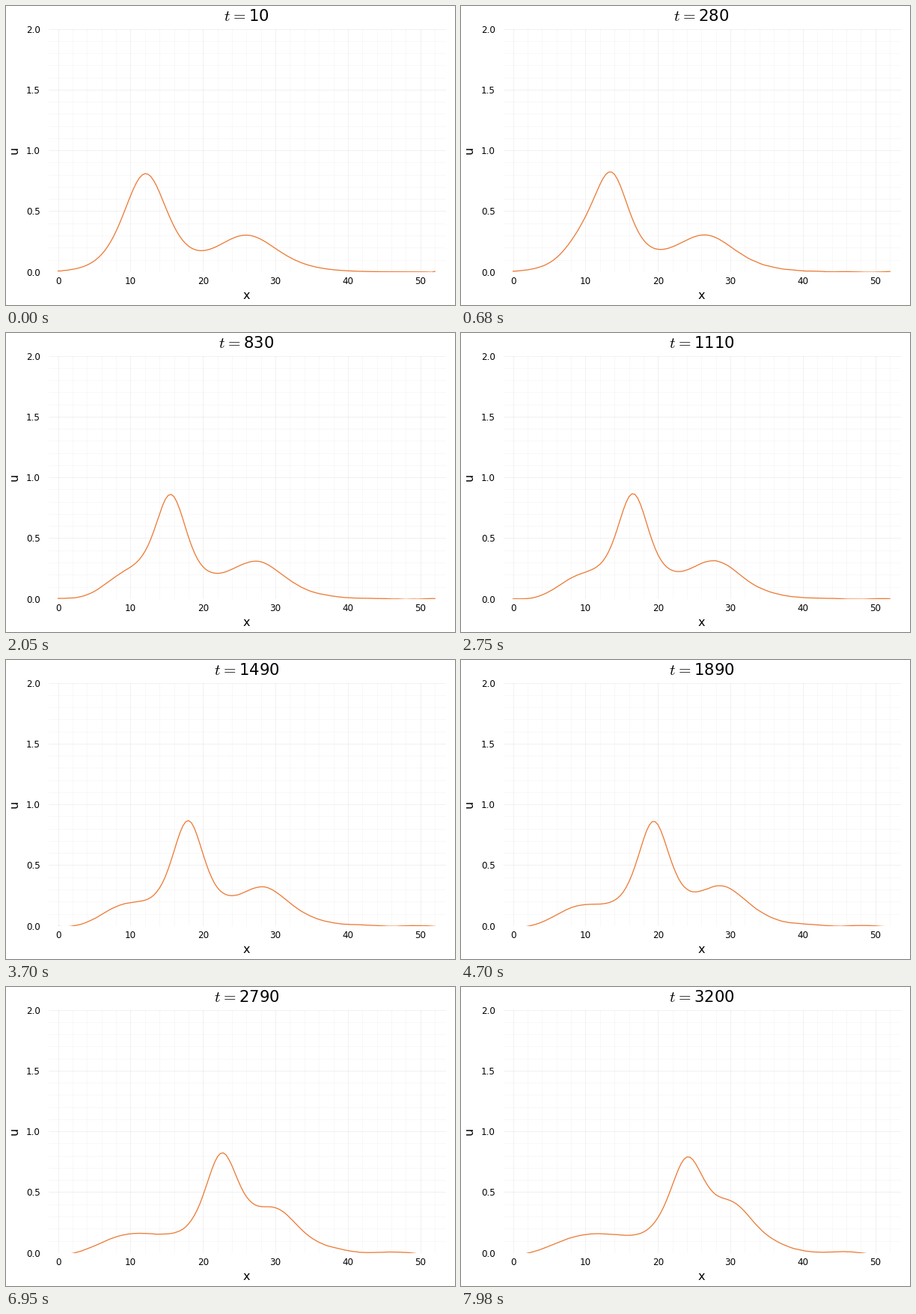
Write a matplotlib script that moves like this. It is 600 by 400 pixels and loops after 8 s.

```python
import numpy as np
import matplotlib.pyplot as plt
from matplotlib.animation import FuncAnimation

W, H, DPI = 600, 400, 100
FRAMES, STEPS, INTERVAL = 320, 10, 25
EPS, MU, DX, DT, N = 0.2, 0.1, 0.4, 0.05, 131

plt.rcParams["font.family"] = "DejaVu Sans"
plt.rcParams["mathtext.fontset"] = "cm"


def pt(px):
    return px * 72 / DPI


def change(u):
    """Central differences of the Korteweg-de Vries terms over one step."""
    a, b, c, d = (np.roll(u, k) for k in (2, 1, -1, -2))
    steepen = EPS * DT / (2 * DX) * (b + u + c) / 3 * (c - b)
    spread = MU * DT / (2 * DX**3) * (d - 2 * c + 2 * b - a)
    return steepen + spread


def solve():
    u0 = (0.8 * (1 - np.tanh(3 * x / 12 - 3) ** 2)
          + 0.3 * (1 - np.tanh(4.5 * x / 26 - 4.5) ** 2))
    u1 = u0 - change(u0)
    waves = []
    for n in range(2, FRAMES * STEPS + 1):
        u0, u1 = u1, u0 - 2 * change(u1)
        if n % STEPS == 0:
            waves.append(u1)
    return waves


x = DX * np.arange(N)
waves = solve()

fig = plt.figure(figsize=(W / DPI, H / DPI), dpi=DPI, facecolor="white")
left, right, top, bottom = 56.5, 588.2, 30.5, 355.8
ax = fig.add_axes([left / W, 1 - bottom / H, (right - left) / W, (bottom - top) / H])
ax.set(xlim=(-1.353, 53.56), ylim=(0, 2))
ax.set_xticks(range(0, 51, 10))
ax.set_yticks(np.arange(0, 2.1, 0.5))
ax.set_xticks(range(0, 53, 2), minor=True)
ax.set_yticks(np.arange(0, 2.05, 0.1), minor=True)
ax.tick_params(which="both", length=0, labelsize=pt(11.9))
ax.tick_params(axis="x", pad=pt(6))
ax.tick_params(axis="y", pad=pt(10.5))
ax.grid(which="major", color="black", alpha=0.1, lw=pt(0.55))
ax.grid(which="minor", color="black", alpha=0.05, lw=pt(0.55))
ax.set_axisbelow(True)
for side in ax.spines.values():
    side.set_visible(False)


def label(px, py, text, size, **kw):
    return fig.text(px / W, 1 - py / H, text, fontsize=pt(size), ha="center", **kw)


label(321.5, 392, "x", 16, va="baseline")
label(11.5, 193, "u", 16, va="center", rotation=90)
title = label(321.5, 20, "", 21.2, va="baseline")
line, = ax.plot([], [], color="#ed7a35", lw=pt(1.3))


def draw(i):
    line.set_data(x, waves[i])
    title.set_text(rf"$t\hspace{{0.05}}=\hspace{{0.05}}${(i + 1) * STEPS}")
    return line, title


anim = FuncAnimation(fig, draw, frames=FRAMES, interval=INTERVAL, repeat=True)
plt.show()
```
